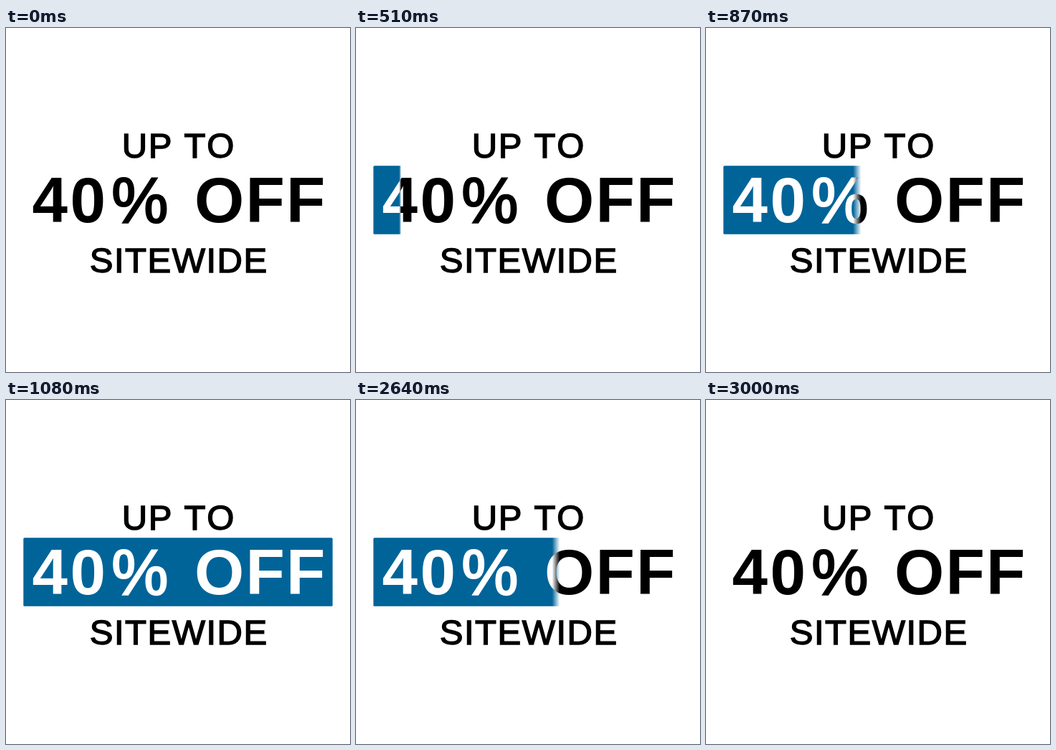
An HTML page with a canvas for the animation above (3.18 s loop, 480 by 480 pixels).

```html
<!DOCTYPE html>
<html lang="en">
<head>
<meta charset="utf-8">
<title>Sitewide sale</title>
<style>
html, body { margin: 0; width: 100%; height: 100%; overflow: hidden; background: #fff; }
canvas { display: block; width: 480px; height: 480px; }
</style>
</head>
<body>
<canvas id="stage" width="480" height="480"></canvas>
<script>
const SIZE = 480, LOOP = 3180, STEP = 30, SHUTTER = 15;
const BOX = { x: 24, y: 192, w: 432, h: 96 };
const FAMILY = '"Liberation Sans", Arial, sans-serif';
const ctx = document.getElementById('stage').getContext('2d');

const layer = document.createElement('canvas');
layer.width = layer.height = SIZE;
const lctx = layer.getContext('2d');

// Draws text whose ink starts at x
function label(c, text, x, y, { font, spacing = 0, color, stroke = 0 }) {
  c.font = `${font} ${FAMILY}`;
  c.letterSpacing = spacing + 'px';
  c.fontKerning = 'none';
  c.fillStyle = c.strokeStyle = color;
  const left = x + c.measureText(text).actualBoundingBoxLeft + stroke / 2;
  c.fillText(text, left, y);
  if (stroke) {
    c.lineWidth = stroke;
    c.lineJoin = 'miter';
    c.miterLimit = 3;
    c.strokeText(text, left, y);
  }
}

function headline(c, color) {
  const bold = 'bold 89px';
  label(c, '40', 37.5, 271, { font: bold, spacing: 3.6, color });
  // The percent sign has lighter strokes than the digits
  label(c, '%', 149, 271, { font: '89px', color, stroke: 2.4 });
  label(c, 'OFF', 266, 271, { font: bold, spacing: 2.2, color });
}

function smallLine(text, x, y, spacing) {
  label(ctx, text, x, y, { font: '49px', spacing, color: '#000', stroke: 1.5 });
}

// Right edge of the blue bar: accelerates in, leaves at constant speed
function edgeAt(t) {
  const k = 3.55;
  if (t < 1700) {
    const p = Math.min(1, Math.max(0, (t - 150) / 930));
    return BOX.x + BOX.w * (Math.exp(k * p) - 1) / (Math.exp(k) - 1);
  }
  return 451 - 0.717 * (t - 2400);
}

function drawBar(t) {
  lctx.globalCompositeOperation = 'source-over';
  lctx.clearRect(0, 0, SIZE, SIZE);
  lctx.fillStyle = '#006499';
  lctx.beginPath();
  lctx.roundRect(BOX.x + 0.3, BOX.y + 0.3, BOX.w - 0.6, BOX.h - 0.6, 1.5);
  lctx.fill();
  headline(lctx, '#fff');

  const full = t >= 1080 && t < 2400;
  if (!full) {
    // Motion-blurred wipe edge
    const a = edgeAt(t - SHUTTER / 2), b = edgeAt(t + SHUTTER / 2);
    const mask = lctx.createLinearGradient(Math.min(a, b), 0, Math.max(a, b), 0);
    mask.addColorStop(0, 'rgba(0,0,0,1)');
    mask.addColorStop(1, 'rgba(0,0,0,0)');
    lctx.globalCompositeOperation = 'destination-in';
    lctx.fillStyle = mask;
    lctx.fillRect(0, 0, SIZE, SIZE);
  }
  ctx.drawImage(layer, 0, 0);
}

function draw(t) {
  ctx.fillStyle = '#fff';
  ctx.fillRect(0, 0, SIZE, SIZE);
  smallLine('UP TO', 164, 181, 1.7);
  smallLine('SITEWIDE', 118, 341, 1.5);
  headline(ctx, '#000');
  if (t >= 180 && t < 3000) drawBar(t);
}

const start = performance.now();
function tick() {
  const t = (performance.now() - start) % LOOP;
  draw(Math.floor(t / STEP) * STEP);
  requestAnimationFrame(tick);
}
tick();
</script>
</body>
</html>
```
